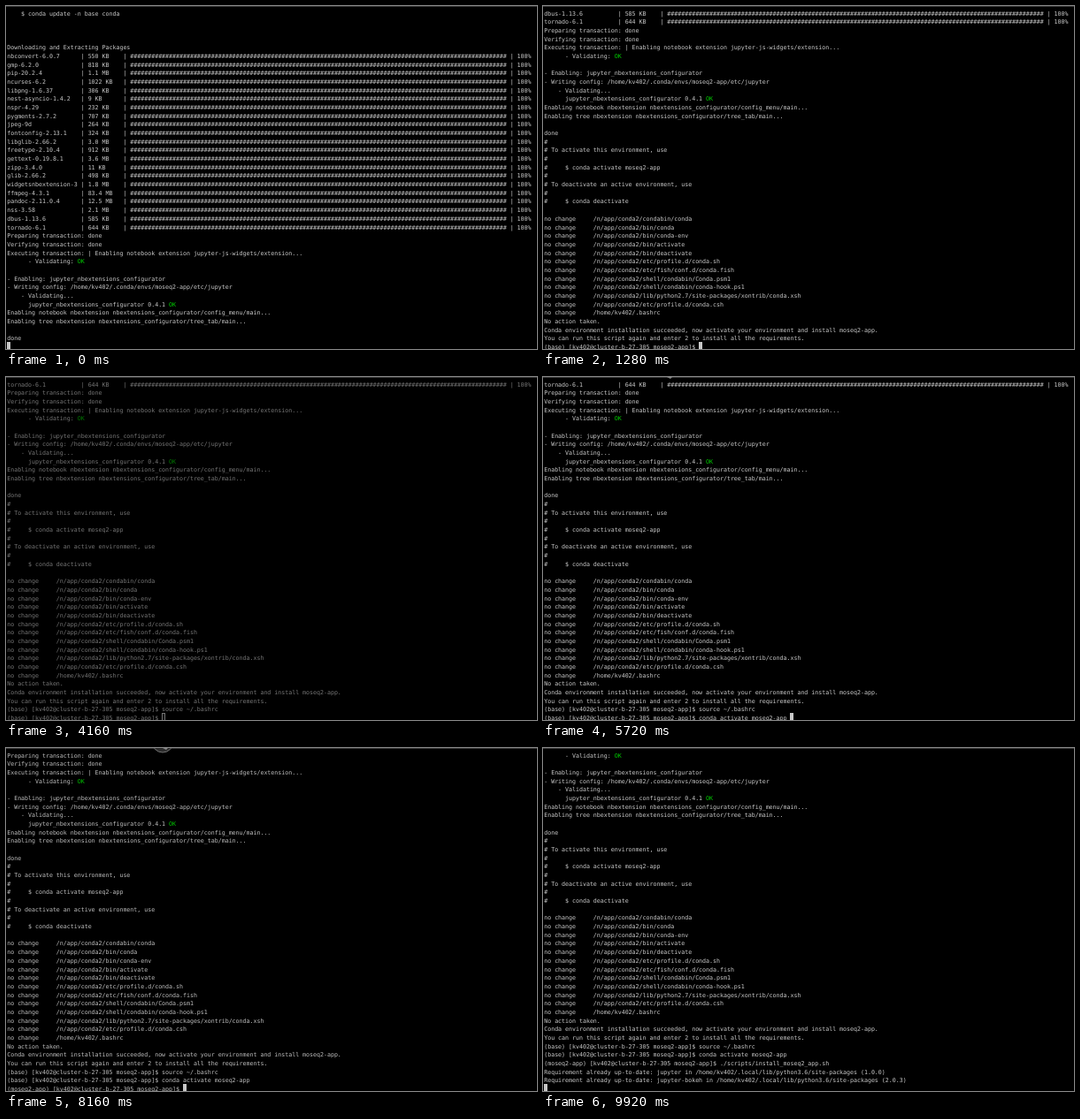
Write an HTML page with a canvas that moves like this. It is 600 by 388 pixels and loops after 10 s.

```html
<!DOCTYPE html>
<html lang="en">
<head>
<meta charset="utf-8">
<title>Terminal session</title>
<style>
  html, body { margin: 0; width: 100%; height: 100%; overflow: hidden; background: #000; }
  canvas { display: block; width: 600px; height: 388px; }
</style>
</head>
<body>
<canvas id="stage" width="600" height="388"></canvas>
<script>
const ctx = document.getElementById('stage').getContext('2d');
const LOOP = 10000, ROWS = 40;
const LEFT = 1.2, BASE = 10.5, CELL_W = 3.975, CELL_H = 9.68;
const FONT_SIZE = CELL_W / 0.60205;
const DIM = 0.58;

const HOME = '/home/kv402';
const HOST = '[kv402@cluster-b-27-305 moseq2-app]$ ';
const BASE_PROMPT = '(base) ' + HOST;
const APP_PROMPT = '(moseq2-app) ' + HOST;
const SOURCE = BASE_PROMPT + 'source ~/.bashrc';
const ACTIVATE = BASE_PROMPT + 'conda activate moseq2-app ';
const INSTALL = APP_PROMPT + './scripts/install_moseq2_app.sh';

const packages = `nbconvert-6.0.7,550 KB
gmp-6.2.0,818 KB
pip-20.2.4,1.1 MB
ncurses-6.2,1022 KB
libpng-1.6.37,306 KB
nest-asyncio-1.4.2,9 KB
nspr-4.29,232 KB
pygments-2.7.2,707 KB
jpeg-9d,264 KB
fontconfig-2.13.1,324 KB
libglib-2.66.2,3.0 MB
freetype-2.10.4,912 KB
gettext-0.19.8.1,3.6 MB
zipp-3.4.0,11 KB
glib-2.66.2,498 KB
widgetsnbextension-3,1.8 MB
ffmpeg-4.3.1,83.4 MB
pandoc-2.11.0.4,12.5 MB
nss-3.58,2.1 MB
dbus-1.13.6,585 KB
tornado-6.1,644 KB`.split('\n').map(row => {
  const [name, size] = row.split(',');
  return `${name.padEnd(20)} | ${size.padEnd(9)} | ${'#'.repeat(107)} | 100%`;
});

const unchanged = [
  'condabin/conda', 'bin/conda', 'bin/conda-env', 'bin/activate', 'bin/deactivate',
  'etc/profile.d/conda.sh', 'etc/fish/conf.d/conda.fish', 'shell/condabin/Conda.psm1',
  'shell/condabin/conda-hook.ps1', 'lib/python2.7/site-packages/xontrib/conda.xsh',
  'etc/profile.d/conda.csh'
].map(p => '/n/app/conda2/' + p).concat(HOME + '/.bashrc').map(p => 'no change     ' + p);

const upToDate = (name, version) =>
  `Requirement already up-to-date: ${name} in ${HOME}/.local/lib/python3.6/site-packages (${version})`;

const lines = [
  '    $ conda update -n base conda', '', '', '',
  'Downloading and Extracting Packages',
  ...packages,
  'Preparing transaction: done',
  'Verifying transaction: done',
  'Executing transaction: | Enabling notebook extension jupyter-js-widgets/extension...',
  '      - Validating: OK',
  '',
  '- Enabling: jupyter_nbextensions_configurator',
  `- Writing config: ${HOME}/.conda/envs/moseq2-app/etc/jupyter`,
  '    - Validating...',
  '      jupyter_nbextensions_configurator 0.4.1 OK',
  'Enabling notebook nbextension nbextensions_configurator/config_menu/main...',
  'Enabling tree nbextension nbextensions_configurator/tree_tab/main...',
  '',
  'done',
  '#',
  '# To activate this environment, use',
  '#',
  '#     $ conda activate moseq2-app',
  '#',
  '# To deactivate an active environment, use',
  '#',
  '#     $ conda deactivate',
  '',
  ...unchanged,
  'No action taken.',
  'Conda environment installation succeeded, now activate your environment and install moseq2-app.',
  'You can run this script again and enter 2 to install all the requirements.',
  SOURCE,
  ACTIVATE,
  INSTALL,
  upToDate('jupyter', '1.0.0'),
  upToDate('jupyter-bokeh', '2.0.3')
];

// [time, finished lines, text on the cursor line]
const steps = [
  [0, 39, ''], [440, 48, ''], [1280, 63, BASE_PROMPT], [2760, 63, SOURCE],
  [3400, 64, BASE_PROMPT], [5720, 64, ACTIVATE], [6000, 65, ''], [6240, 65, APP_PROMPT],
  [8600, 65, INSTALL], [9160, 66, ''], [9840, 67, ''], [9880, 68, '']
];

// Window out of focus: [dims at, starts to brighten]
const unfocused = [[1320, 2440], [3440, 5160], [6640, 8080]];
const FADE = 240;

function focusLevel(t) {
  for (const [from, to] of unfocused) {
    if (t >= from && t < to) return 0;
    if (t >= to && t < to + FADE) {
      const p = (Math.floor((t - to) / 40) + 1) * 40 / FADE;
      return 1 - (1 - p) ** 3;
    }
  }
  return 1;
}

const shade = (r, g, b, k) => `rgb(${Math.round(r * k)},${Math.round(g * k)},${Math.round(b * k)})`;
const colX = col => LEFT + col * CELL_W;

function print(text, col, row) {
  ctx.save();
  ctx.translate(colX(col), BASE + row * CELL_H);
  ctx.scale(FONT_SIZE / 100, FONT_SIZE / 100);
  ctx.fillText(text, 0, 0);
  ctx.restore();
}

function drawLine(text, row, k) {
  const ok = text.endsWith(' OK');
  const body = ok ? text.slice(0, -2) : text;
  ctx.fillStyle = shade(202, 202, 202, k);
  print(body, 0, row);
  if (ok) {
    ctx.fillStyle = shade(0, 205, 0, k);
    print('OK', body.length, row);
  }
}

function drawCursor(col, focused, k) {
  const x = Math.round(colX(col)), y = 380;
  if (focused) {
    ctx.fillStyle = '#c8c8c8';
    ctx.fillRect(x, y, 4, 8);
  } else {
    ctx.strokeStyle = shade(200, 200, 200, k);
    ctx.lineWidth = 1;
    ctx.strokeRect(x + 0.5, y + 0.5, 3, 9);
  }
}

function drawPointer(x) {
  ctx.fillStyle = '#8a8a8a';
  ctx.beginPath();
  ctx.moveTo(x - 3, 0);
  ctx.lineTo(x + 3, 0);
  ctx.lineTo(x + 1, 2);
  ctx.lineTo(x - 1, 1);
  ctx.fill();
}

function drawRing(x) {
  ctx.beginPath();
  ctx.arc(x, -7, 12, 0, Math.PI * 2);
  ctx.fillStyle = '#2c2c2c';
  ctx.fill();
  ctx.strokeStyle = '#707070';
  ctx.lineWidth = 1;
  ctx.stroke();
}

function draw(t) {
  const level = focusLevel(t), k = DIM + (1 - DIM) * level;
  const [, count, live] = steps.filter(s => s[0] <= t).pop();

  ctx.fillStyle = '#000';
  ctx.fillRect(0, 0, 600, 388);
  ctx.fillStyle = '#383838';
  ctx.fillRect(0, 0, 600, 1);

  ctx.font = '100px "DejaVu Sans Mono", monospace';
  ctx.textBaseline = 'alphabetic';
  ctx.textRendering = 'geometricPrecision';
  const top = count - ROWS + 1;
  for (let row = 0; row < ROWS - 1; row++) drawLine(lines[top + row], row, k);
  drawLine(live, ROWS - 1, k);
  drawCursor(live.length, level > 0, k);

  if (t >= 5160 && t < 5360) drawRing(143);
  if (t >= 8080 && t < 8320) drawRing(177);
  if (t >= 5160 && t < 6000) drawPointer(143);
  if (t >= 8080 && t < 9000) drawPointer(180);
}

const start = performance.now();
function tick() {
  draw((performance.now() - start) % LOOP);
  requestAnimationFrame(tick);
}
tick();
</script>
</body>
</html>
```
